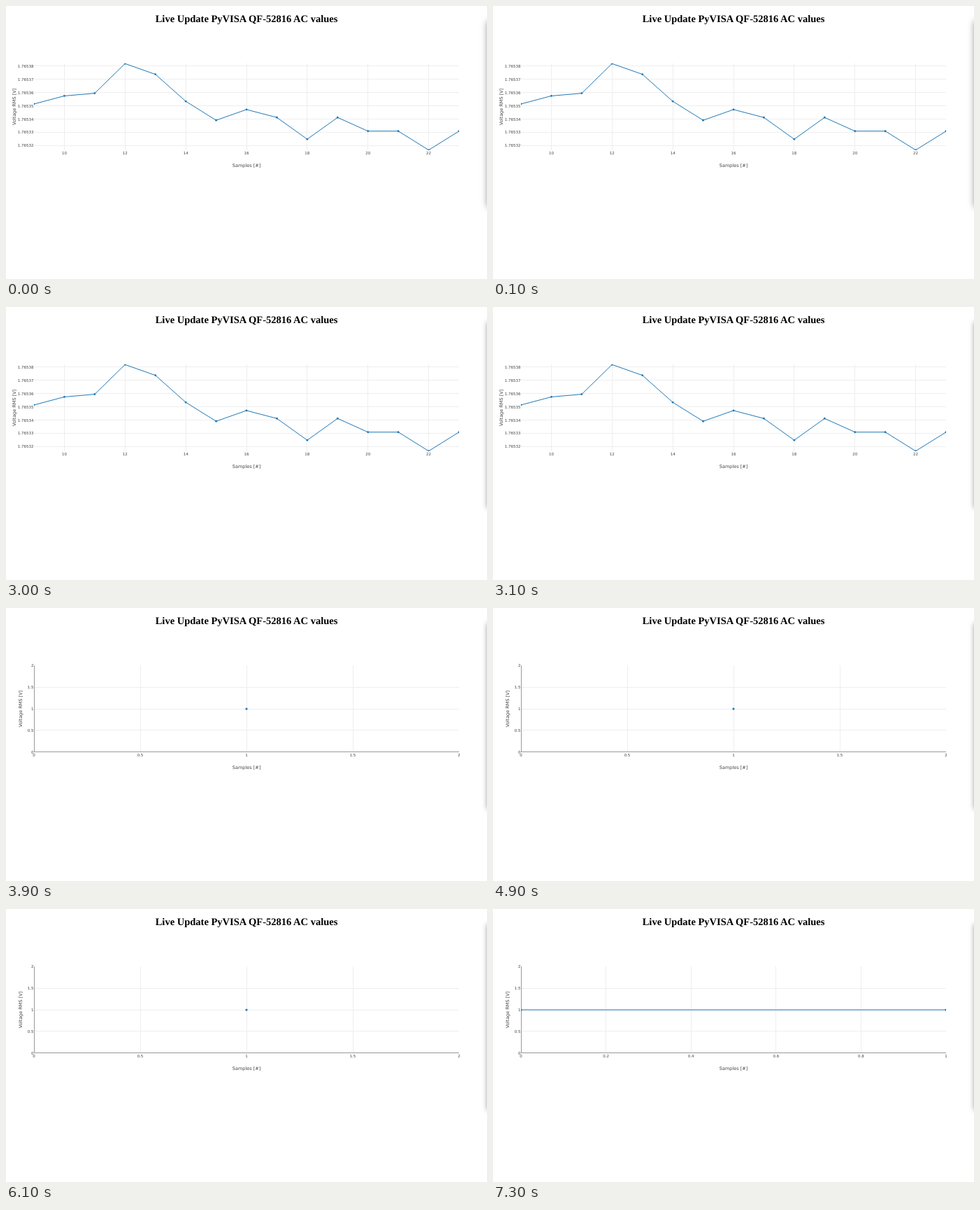
An HTML page that plays this animation: 688 by 390 pixels, repeating every 8 s.

```html
<!DOCTYPE html>
<html lang="en">
<head>
<meta charset="utf-8">
<title>Live chart</title>
<style>
  html, body { margin: 0; width: 100%; height: 100%; overflow: hidden; background: #fff; }
  #stage { position: relative; width: 688px; height: 390px; overflow: hidden; }
  svg { position: absolute; inset: 0; }
  text { font: 5.5px "DejaVu Sans", Verdana, sans-serif; fill: #444; text-anchor: middle; text-rendering: geometricPrecision; }
  .heading { font: bold 14.5px "Liberation Serif", "Times New Roman", serif; fill: #000; }
  .axis-title { font-size: 6.5px; }
  .end { text-anchor: end; }
  .grid { stroke: #eee; }
  .zero { stroke: #999; }
  .line { fill: none; stroke: #1f77b4; stroke-width: 1; stroke-linejoin: round; }
  .dot { fill: #1f77b4; }
  .shade { position: absolute; left: 688px; top: 22px; width: 40px; height: 265px; }
  #wide { box-shadow: 0 0 9px rgba(0, 0, 0, .38); }
  #slim { box-shadow: 0 0 7px rgba(0, 0, 0, .38); }
</style>
</head>
<body>
<div id="stage">
  <svg id="chart" width="688" height="390" viewBox="0 0 688 390">
    <clipPath id="plot"><rect x="40" y="82" width="608" height="124"/></clipPath>
    <text class="heading" x="344" y="23">Live Update PyVISA QF-52816 AC values</text>
    <text class="axis-title" x="344" y="229.6">Samples [#]</text>
  </svg>
  <div id="wide" class="shade"></div>
  <div id="slim" class="shade"></div>
</div>
<script>
const LOOP = 8000;
const LEFT = 40, RIGHT = 648, TOP = 82.3, BOTTOM = 205.8;
const chart = document.getElementById('chart');

function add(parent, tag, attrs, text) {
  const el = document.createElementNS('http://www.w3.org/2000/svg', tag);
  for (const key in attrs) el.setAttribute(key, attrs[key]);
  if (text !== undefined) el.textContent = text;
  return parent.appendChild(el);
}

function range(start, step, count) {
  return Array.from({ length: count }, (_, i) => +(start + i * step).toFixed(5));
}

const snap = v => Math.floor(v) + 0.5;

function showBetween(el, from, to) {
  const steps = [[0, from === 0 ? 1 : 0], [from, 1], [to, 0], [LOOP, to === LOOP ? 1 : 0]];
  el.animate(
    steps.map(([time, opacity]) => ({ offset: time / LOOP, opacity, easing: 'steps(1, end)' })),
    { duration: LOOP, iterations: Infinity }
  );
}

function drawPlot({ xRange, yRange, xTicks, yTicks, points, titleX, zeroLines, from, to }) {
  const g = add(chart, 'g', {});
  const mapX = v => LEFT + (v - xRange[0]) / (xRange[1] - xRange[0]) * (RIGHT - LEFT);
  const mapY = v => BOTTOM - (v - yRange[0]) / (yRange[1] - yRange[0]) * (BOTTOM - TOP);
  const vertical = (x, cls) => add(g, 'path', { class: cls, d: `M${snap(x)} 82V206` });
  const horizontal = (y, cls) => add(g, 'path', { class: cls, d: `M40 ${snap(y)}H648` });

  for (const v of xTicks) {
    const x = mapX(v);
    if (x > LEFT && x < RIGHT) vertical(x, 'grid');
    add(g, 'text', { x, y: 212 }, v);
  }
  for (const v of yTicks) {
    const y = mapY(v);
    if (y > TOP && y < BOTTOM) horizontal(y, 'grid');
    add(g, 'text', { class: 'end', x: 39.6, y: y + 2 }, v);
  }
  if (zeroLines) {
    vertical(LEFT, 'zero');
    horizontal(BOTTOM, 'zero');
  }
  add(g, 'text', { class: 'axis-title', transform: `translate(${titleX} 144) rotate(-90)` }, 'Voltage RMS [V]');

  const trace = add(g, 'g', { 'clip-path': 'url(#plot)' });
  const placed = points.map(([x, y]) => [mapX(x), mapY(y)]);
  add(trace, 'polyline', { class: 'line', points: placed.join(' ') });
  for (const [cx, cy] of placed) add(trace, 'circle', { class: 'dot', cx, cy, r: zeroLines ? 1.6 : 1.4 });
  showBetween(g, from, to);
}

// Readings in units of 10 nV above 1.7653 V, starting at sample 9
const readings = [514, 575, 595, 819, 738, 534, 391, 472, 412, 248, 412, 309, 309, 166, 309];
const volts = n => 1.7653 + n * 1e-7;

drawPlot({
  xRange: [9, 23], yRange: [volts(166), volts(819)],
  xTicks: range(10, 2, 7), yTicks: range(1.76532, 0.00001, 7),
  points: readings.map((n, i) => [9 + i, volts(n)]),
  titleX: 14.3, zeroLines: false, from: 0, to: 3900
});

const unitPlot = { yRange: [0, 2], yTicks: range(0, 0.5, 5), titleX: 22.8, zeroLines: true };

drawPlot({
  ...unitPlot, xRange: [0, 2], xTicks: range(0, 0.5, 5),
  points: [[1, 1]], from: 3900, to: 7300
});

drawPlot({
  ...unitPlot, xRange: [0, 1], xTicks: range(0, 0.2, 6),
  points: [[0, 1], [1, 1]], from: 7300, to: LOOP
});

showBetween(document.getElementById('wide'), 0, 3000);
showBetween(document.getElementById('slim'), 3000, LOOP);
</script>
</body>
</html>
```
